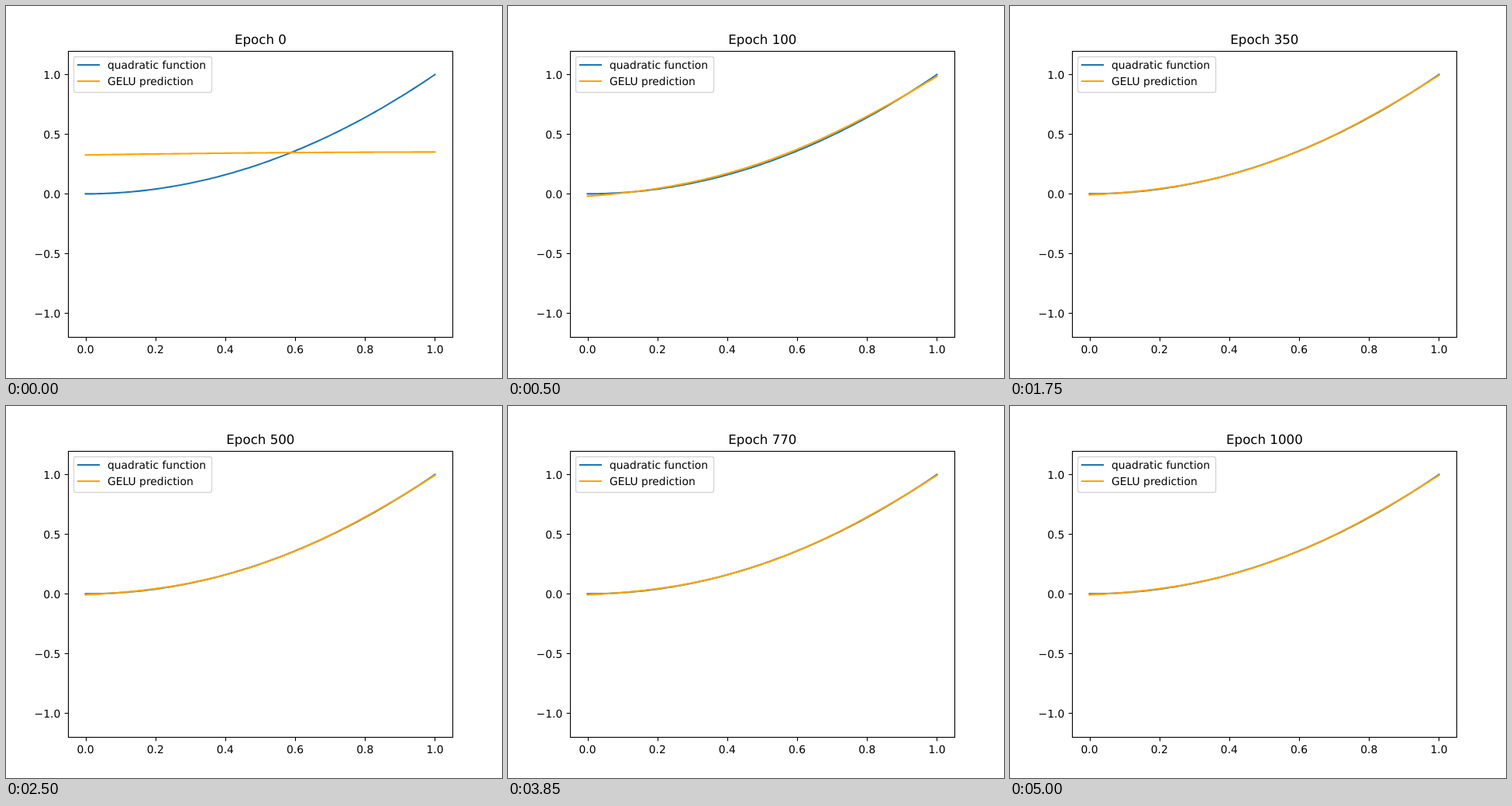
Animation, 640 px wide and 480 px high, one loop 5.05 s. Source, as an HTML page:

```html
<!DOCTYPE html>
<html lang="en">
<head>
<meta charset="utf-8">
<title>Curve fitting</title>
<style>
  html, body { margin: 0; width: 100%; height: 100%; overflow: hidden; background: #fff; }
  svg { display: block; width: 640px; height: 480px; }
  text { font: 13.889px "DejaVu Sans", sans-serif; text-rendering: geometricPrecision; }
  #title { font-size: 16.667px; text-anchor: middle; }
  .axis { fill: none; stroke: #000; stroke-width: 1.11; }
  .line { fill: none; stroke-width: 2.083; stroke-linecap: square; stroke-linejoin: round; }
  .true { stroke: #1f77b4; }
  .fit { stroke: #ffa500; }
</style>
</head>
<body>
<svg viewBox="0 0 640 480">
  <g id="ticks"></g>
  <path id="truth" class="line true"/>
  <path id="fit" class="line fit"/>
  <rect class="axis" x="80.5" y="58.5" width="496" height="369"/>
  <text id="title" x="328.4" y="49"></text>
  <rect x="87.5" y="65.5" width="178" height="46" rx="2.8" fill="#fff" fill-opacity=".8"
        stroke="#ccc" stroke-opacity=".8" stroke-width="1.39"/>
  <path class="line true" d="M93 76H120"/>
  <path class="line fit" d="M93 97H120"/>
  <text x="131" y="81">quadratic function</text>
  <text x="131" y="102">GELU prediction</text>
</svg>
<script>
const LOOP = 5050, STEP = 50, EPOCHS_PER_STEP = 10, SAMPLES = 100;
const $ = id => document.getElementById(id);
const px = x => 102.545 + 450.909 * x;
const py = y => 242.4 - 154 * y;
const snap = v => Math.floor(v + 0.5) + 0.5;
const mix = (a, b, k) => a + (b - a) * k;

// The flat guess tilts into a line that overshoots, then bends into the parabola.
function prediction(epoch) {
  const tilt = 1 - Math.exp(-((epoch / 18) ** 2));
  const overshoot = Math.exp(-epoch / 22.4);
  const straight = Math.exp(-((epoch / 65) ** 2));
  const start = mix(0.326, -0.008 - 1.05 * overshoot, tilt);
  const end = mix(0.351, 0.993 - 0.74 * overshoot, tilt);
  return x => {
    const settledSag = 0.975 - 0.12 * (2 * x - 1) ** 2;
    const sag = mix(-0.02, mix(settledSag, 0.09 - 0.3 * x, straight), tilt);
    return mix(start, end, x) - x * (1 - x) * sag;
  };
}

function plot(path, fn) {
  const points = Array.from({ length: SAMPLES }, (_, i) => {
    const x = i / (SAMPLES - 1);
    return px(x).toFixed(2) + " " + py(fn(x)).toFixed(2);
  });
  path.setAttribute("d", "M" + points.join("L"));
}

function drawTicks() {
  let markup = "";
  const add = (d, x, y, anchor, value) => {
    const label = value.toFixed(1).replace("-", "\u2212");
    markup += `<path class="axis" d="${d}"/><text x="${x}" y="${y}" text-anchor="${anchor}">${label}</text>`;
  };
  for (let i = 0; i <= 5; i++) {
    const x = px(i / 5);
    add(`M${snap(x)} 427.5v4.86`, x, 448, "middle", i / 5);
  }
  for (let i = -2; i <= 2; i++) {
    const y = snap(py(i / 2));
    add(`M80.5 ${y}h-4.86`, 70.3, y + 5.5, "end", i / 2);
  }
  $("ticks").innerHTML = markup;
}

let shown = -1;
function render(elapsed) {
  const epoch = Math.floor((elapsed % LOOP) / STEP) * EPOCHS_PER_STEP;
  if (epoch === shown) return;
  shown = epoch;
  $("title").textContent = "Epoch " + epoch;
  plot($("fit"), prediction(epoch));
}

drawTicks();
plot($("truth"), x => x * x);
const began = performance.now();
render(0);
requestAnimationFrame(function loop() {
  render(performance.now() - began);
  requestAnimationFrame(loop);
});
</script>
</body>
</html>
```
